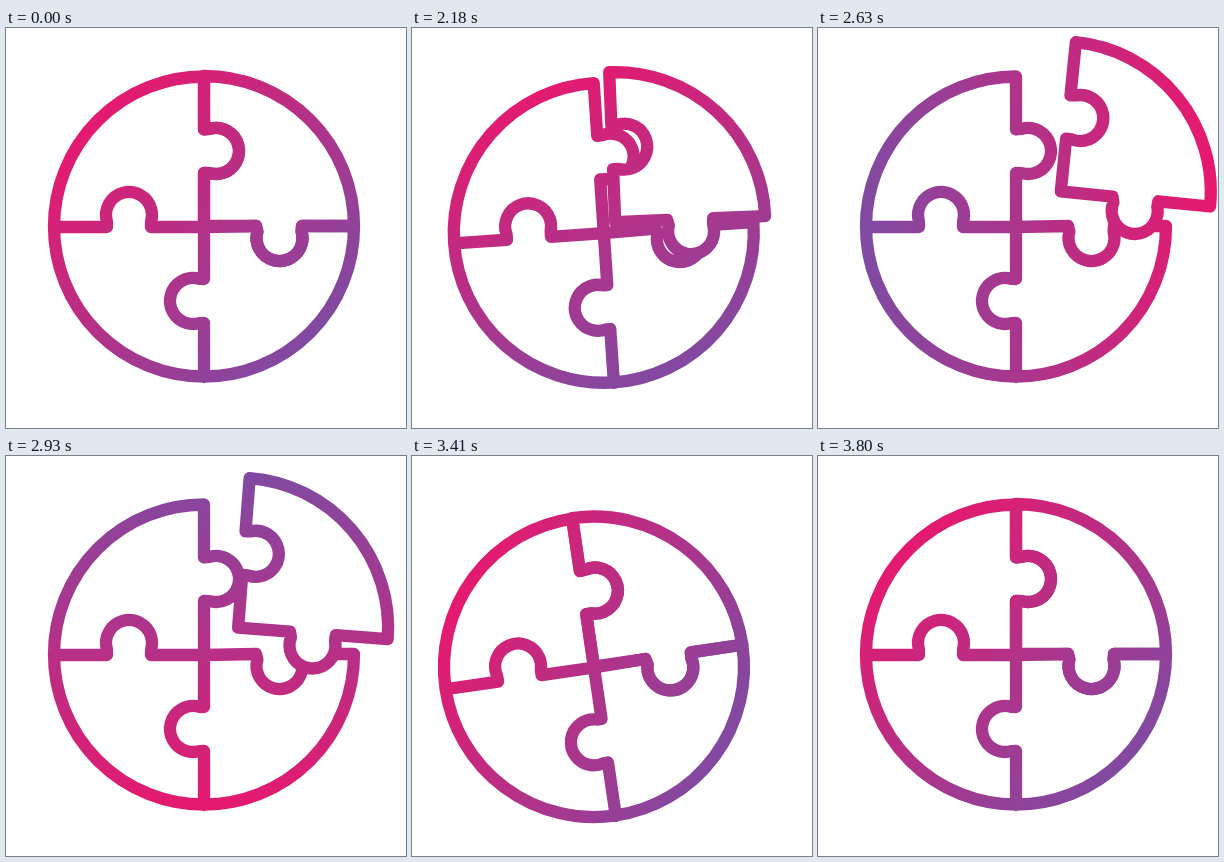
Write an HTML page with a canvas that moves like this. It is 400 px wide and 400 px high and loops after 3830 ms.

```html
<!DOCTYPE html>
<html>
<head>
<meta charset="utf-8">
<style>
html, body { margin: 0; width: 100%; height: 100%; overflow: hidden; background: #fff; }
canvas { display: block; width: 100vw; height: 100vh; }
</style>
</head>
<body>
<canvas id="stage"></canvas>
<script>
const canvas = document.getElementById('stage');
const ctx = canvas.getContext('2d');
const LOOP = 3830, START = 2030, STEP = 30;
const CX = 198, CY = 198.5, R = 150, KNOB = 23;
const PINK = '#e6196e', PURPLE = '#804aa2';
const TURN = [[2000, 0], [2330, 45], [2630, 131], [2930, 225], [3170, 310], [3410, 344], [3800, 360]];

const clamp = x => Math.max(0, Math.min(1, x));
const smooth = x => x * x * (3 - 2 * x);
const span = (t, a, b) => clamp((t - a) / (b - a));

// Both tabs are traced so that they can be part of a longer path.
function upperEdge(p) {
  p.lineTo(198, 101.5);
  p.arc(210, 123, KNOB, -1.85, 1.85);
  p.lineTo(198, 145);
}
function rightEdge(p) {
  p.lineTo(250, 198);
  p.arc(273.5, 210, KNOB, Math.PI + 0.28, -0.28, true);
  p.lineTo(296, 198);
}

const body = new Path2D();
body.arc(CX, CY, R, 0, Math.PI * 1.5);
body.moveTo(198, 48.5);
upperEdge(body);
body.lineTo(198, 251);
body.arc(187, 273, KNOB, -Math.PI / 2 + 0.28, Math.PI / 2 - 0.28, true);
body.lineTo(198, 295);
body.lineTo(198, 349);
body.moveTo(48, 199);
body.lineTo(101, 199);
body.arc(123, 187, KNOB, Math.PI - 0.28, 0.28);
body.lineTo(145, 199);
body.lineTo(198, 199);
rightEdge(body);
body.lineTo(348, 198);

const piece = new Path2D();
piece.moveTo(198, 48);
upperEdge(piece);
piece.lineTo(198, 198);
rightEdge(piece);
piece.lineTo(348, 198);
piece.arc(CX, 198, R, 0, -Math.PI / 2, true);
piece.closePath();

// Smooth curve through the keys.
function turnAt(t) {
  const k = TURN, last = k.length - 1;
  if (t <= k[0][0]) return 0;
  if (t >= k[last][0]) return 360;
  let i = 0;
  while (t > k[i + 1][0]) i++;
  const slope = j => j === 0 || j === last ? 0.03
    : (k[j + 1][1] - k[j - 1][1]) / (k[j + 1][0] - k[j - 1][0]);
  const h = k[i + 1][0] - k[i][0], u = (t - k[i][0]) / h, v = 1 - u;
  return v * v * (1 + 2 * u) * k[i][1] + u * u * (3 - 2 * u) * k[i + 1][1]
    + h * u * v * (v * slope(i) - u * slope(i + 1));
}

// How far the loose piece has flown.
function flightAt(t) {
  if (t < 2630) return 1.28 * (1 - Math.pow(1 - span(t, 2130, 2630), 3));
  return 1.28 * (1 - Math.pow(span(t, 2630, 3190), 2.3));
}

// Windup before the throw, then recoil after the landing.
function swayAt(t) {
  const windup = smooth(span(t, 1990, 2110)) * (1 - smooth(span(t, 2110, 2270)));
  const fade = 1 - Math.pow(1 - span(t, 3360, 3800), 1.5);
  const recoil = smooth(span(t, 3135, 3360)) * (1 - smooth(fade));
  return {
    x: -10.5 * windup - 17.3 * recoil,
    y: 10.5 * windup + 13.5 * recoil,
    deg: -6.5 * windup - 9 * recoil
  };
}

function rotateAt(x, y, deg) {
  ctx.translate(x, y);
  ctx.rotate(deg * Math.PI / 180);
  ctx.translate(-x, -y);
}

function draw(time) {
  const rest = time < START;
  const t = START + Math.floor((time - START) / STEP) * STEP;
  const sway = rest ? { x: 0, y: 0, deg: 0 } : swayAt(t);
  const flight = rest ? 0 : flightAt(t);
  const angle = ((rest ? 0 : turnAt(t)) - 135) * Math.PI / 180;
  const w = innerWidth, h = innerHeight, dpr = devicePixelRatio || 1;
  const pw = Math.round(w * dpr), ph = Math.round(h * dpr);
  if (canvas.width !== pw || canvas.height !== ph) {
    canvas.width = pw;
    canvas.height = ph;
  }
  ctx.setTransform(pw / 400, 0, 0, ph / 400, 0, 0);
  ctx.globalCompositeOperation = 'source-over';
  ctx.clearRect(0, 0, 400, 400);
  ctx.lineWidth = 12.3;
  ctx.lineCap = ctx.lineJoin = 'round';
  ctx.strokeStyle = ctx.fillStyle = '#000';

  ctx.save();
  ctx.translate(sway.x, sway.y);
  rotateAt(CX, CY, sway.deg);
  ctx.stroke(body);
  ctx.translate(35 * flight, -27 * flight);
  rotateAt(198, 198, 4.5 * flight);
  if (flight > 0.2) {
    ctx.globalCompositeOperation = 'destination-out';
    ctx.fill(piece);
    ctx.globalCompositeOperation = 'source-over';
  }
  ctx.stroke(piece);
  ctx.restore();

  // Tint the lines with the turning gradient, then lay white below.
  const gx = CX + sway.x + 17 * flight, gy = CY + sway.y - 14 * flight;
  const half = 160 + 11 * flight;
  const dx = Math.cos(angle) * half, dy = Math.sin(angle) * half;
  const tint = ctx.createLinearGradient(gx + dx, gy + dy, gx - dx, gy - dy);
  tint.addColorStop(0, PINK);
  tint.addColorStop(1, PURPLE);
  ctx.globalCompositeOperation = 'source-in';
  ctx.fillStyle = tint;
  ctx.fillRect(0, 0, 400, 400);
  ctx.globalCompositeOperation = 'destination-over';
  ctx.fillStyle = '#fff';
  ctx.fillRect(0, 0, 400, 400);
}

const begin = performance.now();
function loop() {
  draw((performance.now() - begin) % LOOP);
  requestAnimationFrame(loop);
}
loop();
</script>
</body>
</html>
```
